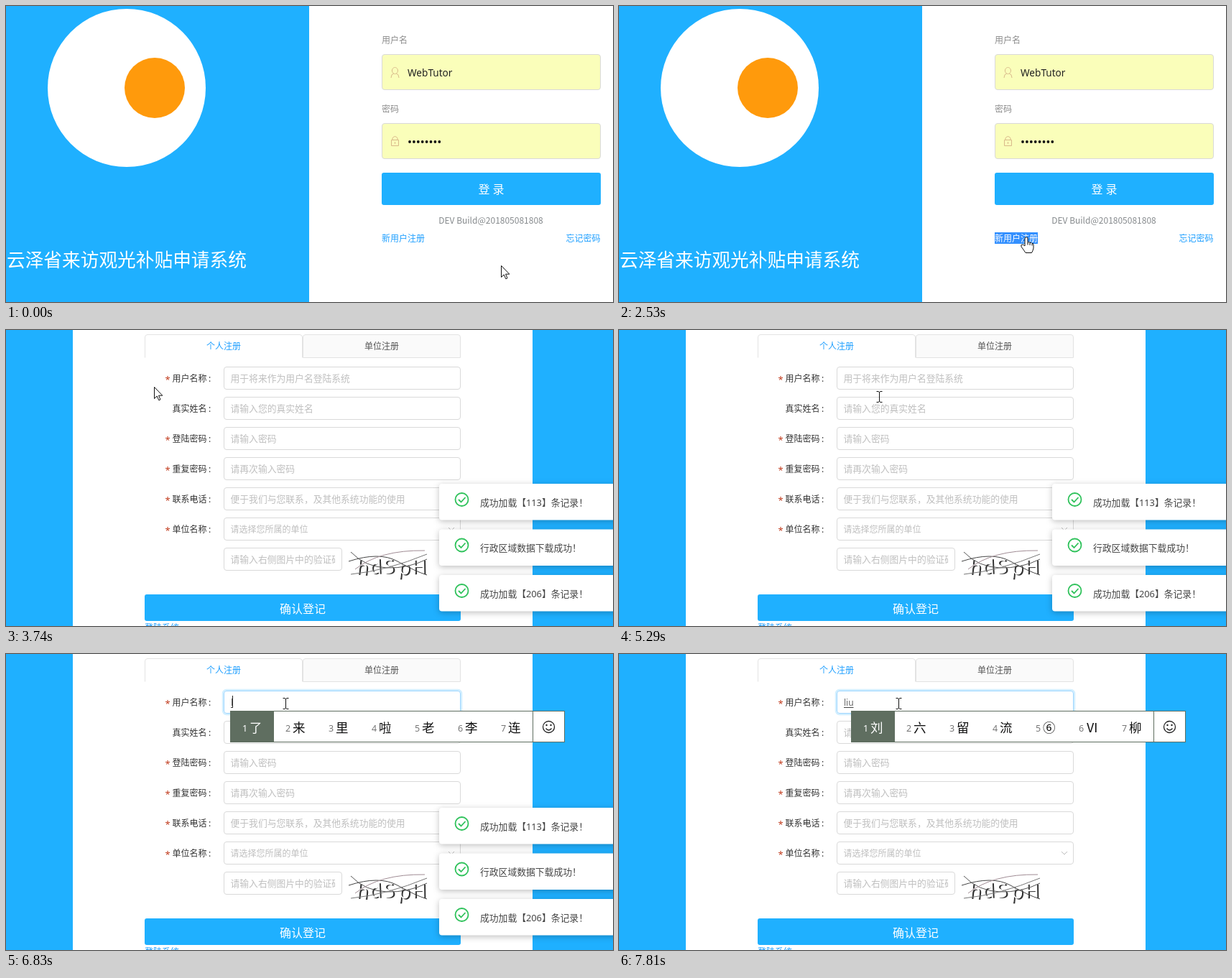
An HTML page for the animation above (8000 ms loop, 845 px wide and 412 px high).

```html
<!DOCTYPE html>
<html lang="zh-CN">
<head>
<meta charset="utf-8">
<style>
html, body { margin: 0; width: 100%; height: 100%; overflow: hidden; background: #fff; }
svg { display: block; }
#stage { width: 845px; height: 412px; }
text { font-family: "Noto Sans", "Noto Sans CJK SC", "Noto Sans CJK", sans-serif; white-space: pre; }
.narrow { font-family: "Noto Sans CJK SC", "Noto Sans CJK", sans-serif; }
</style>
</head>
<body>
<svg id="stage" viewBox="0 0 845 412">
  <g id="login"></g>
  <g id="register"></g>
  <g id="toasts"></g>
  <g id="ime"></g>
  <path id="cursor" stroke="#111" stroke-linejoin="round"/>
</svg>
<script>
const LOOP = 8000, BLUE = '#1fb0ff', LINK = '#1e9fff', HINT = '#bfbfbf', YELLOW = '#fafeba';
const ROW = 42;
const $ = id => document.getElementById(id);
const clamp = v => Math.max(0, Math.min(1, v));
const repeat = (n, make) => Array.from({ length: n }, (_, i) => make(i)).join('');

const text = (x, cy, size, fill, str, more = '') =>
  `<text x="${x}" y="${cy + size * .38}" font-size="${size}" fill="${fill}" ${more}>${str}</text>`;
const rect = (x, y, w, h, fill, more = '') =>
  `<rect x="${x}" y="${y}" width="${w}" height="${h}" fill="${fill}" ${more}/>`;
const box = (x, y, w, h, fill = '#fff', more = '') =>
  rect(x + .5, y + .5, w - 1, h - 1, fill, `rx="3.5" stroke="#d9d9d9" ${more}`);
const circle = (x, y, r, fill, more = '') =>
  `<circle cx="${x}" cy="${y}" r="${r}" fill="${fill}" ${more}/>`;
const line = (d, stroke, width = 1, fill = 'none') =>
  `<path d="${d}" fill="${fill}" stroke="${stroke}" stroke-width="${width}"/>`;
const MIDDLE = 'text-anchor="middle"';

// Login page
$('login').innerHTML =
  rect(0, 0, 845, 412, '#fff') + rect(0, 0, 422, 412, BLUE) +
  circle(168, 114, 110, '#fff') + circle(207, 114, 42, '#ff9a0c') +
  text(1, 353, 25.7, '#fff', '云泽省来访观光补贴申请系统') +
  text(523, 47.5, 12, '#8c8c8c', '用户名') +
  box(523, 67, 305, 50, YELLOW) +
  line('M541.5 85.5a4 4.5 0 1 1-.1 0M536 100q0-5 4-6.5M547 100q0-5-4-6.5', '#d9b98a') +
  text(559, 93, 13.6, '#222', 'WebTutor') +
  text(523, 143.5, 12, '#8c8c8c', '密码') +
  box(523, 163, 305, 50, YELLOW) +
  line('M536.500 186.500h10v8h-10zM538 186v-2q3.500-5 7 0v2M541.500 189v3', '#d9b98a') +
  repeat(8, i => circle(562 + i * 5.9, 189, 1.9, '#111')) +
  rect(523, 232, 305, 45, BLUE, 'id="enter" rx="3"') +
  text(675.5, 254.5, 16, '#fff', '登 录', MIDDLE) +
  text(675, 298.5, 12, '#85898c', 'DEV Build@201805081808', `${MIDDLE} class="narrow"`) +
  text(523, 323.5, 12, LINK, '新用户注册') +
  text(779.5, 323.5, 12, LINK, '忘记密码') +
  '<g id="selection">' + rect(523, 315, 60, 16, '#3390ff') +
  text(523, 323.5, 12, '#fff', '新用户注册') + '</g>';

// Registration page
const fields = [
  ['用户名称', '用于将来作为用户名登陆系统'],
  ['真实姓名', '请输入您的真实姓名', 'optional'],
  ['登陆密码', '请输入密码'],
  ['重复密码', '请再次输入密码'],
  ['联系电话', '便于我们与您联系，及其他系统功能的使用'],
  ['单位名称', '请选择您所属的单位'],
];
const form = fields.map(([label, hint, optional], i) => {
  const cy = 67.5 + i * ROW;
  return (optional ? '' : text(221.5, cy + 2, 13, '#c0391b', '*')) +
    text(231.5, cy, 12, '#333', label) + text(282, cy, 12, '#333', ':') +
    box(303, cy - 16.5, 330, 32, '#fff', `id="field${i}"`) +
    text(312.5, cy, i === 5 ? 12 : 12.8, HINT, hint, `id="hint${i}"`);
}).join('');

const letters = (shift, fill) => [...'hdSpH'].map((letter, i) => {
  const x = 487 + i * 19.5;
  return text(x + shift, 329 + shift / 2, 27, fill, letter, `transform="rotate(${6 * Math.cos(i * 2)} ${x} 338)"`);
}).join('');
const captcha = letters(2, '#333') + letters(0, '#fff') +
  line('M480 309Q500 330 530 331T586 319', '#555') +
  line('M477 322Q520 308 545 322T586 341', '#444') +
  line('M486 333Q520 306 583 307', '#a08c94') +
  line('M480 340Q530 335 586 312', '#777');

const tab = (x, fill, end) =>
  line(`M${x + .5} 38.5V10q0-3.500 3.500-3.500h212q3.500 0 3.500 3.500V38.500${end}`, '#e3e3e3', 1, fill);

$('register').innerHTML =
  rect(0, 0, 845, 412, BLUE) + rect(93, 0, 640, 412, '#fff') +
  tab(193, '#fff', '') + tab(413, '#fafafa', 'z') +
  text(303, 22.5, 12, LINK, '个人注册', MIDDLE) +
  text(523, 22.5, 12, '#555', '单位注册', MIDDLE) +
  rect(302, 50, 332, 34, 'none', `id="glow" rx="5" stroke="${BLUE}" stroke-width="2.5"`) +
  form + line('M616 275l4 4 4-4', '#bbb') +
  box(303, 303, 165, 32) +
  '<svg x="303" y="303" width="155" height="32" overflow="hidden">' +
  text(9.5, 16.5, 12.8, HINT, '请输入右侧图片中的验证码') + '</svg>' + captcha +
  rect(193, 368, 440, 37, BLUE, 'rx="3"') +
  text(413, 387.5, 16, '#fff', '确认登记', `${MIDDLE} font-weight="500"`) +
  text(193, 414.5, 12, LINK, '登陆系统');

// Notifications
const notes = ['成功加载【113】条记录！', '行政区域数据下载成功！', '成功加载【206】条记录！'];
$('toasts').innerHTML = notes.map(note =>
  '<g>' + rect(603, 0, 260, 50.5, '#fff', 'rx="4" style="filter:drop-shadow(0 2px 4px rgba(0,0,0,.25))"') +
  circle(634.5, 22, 9, 'none', 'stroke="#2fc25b" stroke-width="1.8"') +
  line('M630 22l3.500 3.500 6-6.500', '#2fc25b', 1.8) +
  text(660, 26, 12.8, '#444', note) + '</g>').join('');
const toasts = [...$('toasts').children];

// Input method
const FOCUS = 5740, BLINK = 545;
const entries = [
  { time: FOCUS, typed: '' },
  { time: 6830, typed: 'l', words: '了来里啦老李连' },
  { time: 7050, typed: 'li', words: '里李力离利理丽' },
  { time: 7150, typed: 'liu', words: '刘六留流⑥Ⅵ柳' },
];
const pen = document.createElement('canvas').getContext('2d');

function candidates(x, words) {
  const face = x + 443.5;
  return rect(x + .5, 79.5, 465, 43, '#fff', 'stroke="#5f6e60"') + rect(x, 79, 61, 44, '#5f6e60') +
    line(`M${x + 421.5} 79V123`, '#5f6e60') +
    [...words].map((word, i) =>
      text(x + 17 + i * 60, 103.5, 12.5, i ? '#777' : '#fff', i + 1) +
      text(x + 27 + i * 60, 102, 17.5, i ? '#111' : '#fff', word)).join('') +
    circle(face, 101.5, 8, 'none', 'stroke="#222" stroke-width="1.3"') +
    line(`M${face - 4} 103.500q4 5 8 0`, '#222', 1.3) +
    circle(face - 3, 99, 1.2, '#222') + circle(face + 3, 99, 1.2, '#222');
}

function inputMarkup({ time, typed, words }, now) {
  pen.font = '12px "Noto Sans", sans-serif';
  const caret = Math.floor(312.5 + pen.measureText(typed).width) + .5;
  const lit = Math.floor((now - time) / BLINK) % 2 === 0;
  return (lit ? line(`M${caret} 58V75`, '#222') : '') +
    (typed && text(313, 67.5, 12, '#666', typed) + line(`M313 74.500H${caret}`, '#444') +
      candidates(Math.round(caret - 4), words));
}

// Pointer: each run samples an eased path through a few key points
const steps = [];
function run(start, end, count, ...keys) {
  for (let i = 0; i < count; i++) {
    const u = i / (count - 1);
    const along = (1 - Math.cos(Math.PI * u)) / 2 * (keys.length - 1);
    const k = Math.min(Math.floor(along), keys.length - 2), f = along - k;
    const [x, y] = keys[k].map((v, axis) => Math.round(v + (keys[k + 1][axis] - v) * f));
    steps.push({ t: start + (end - start) * u, x, y });
  }
}
run(0, 890, 9, [689, 361], [600, 250], [490, 320]);
run(1010, 1760, 8, [497, 330], [635, 366], [502, 328]);
run(2190, 2530, 4, [512, 340], [567, 321]);
run(2960, 3740, 8, [570, 321], [206, 79]);
run(3860, 4610, 8, [210, 80], [320, 16], [460, 338]);
run(4730, 5290, 6, [497, 282], [375, 54], [362, 93]);
run(5400, 5740, 4, [362, 97], [389, 69]);

const shapes = {
  arrow: 'M.5.5V16.500L4.200 13 6.800 18.800 9 17.800 6.500 12.200H11.800Z',
  hand: 'M-2 13V2Q0-1 2 2V8.500Q4 6.500 5 8.500Q7 7.500 8 9.500Q10 8.500 10 11.500V16Q9.500 19 7.500 22.500H-1Q-4 18-7 14Q-8 11-5.500 11Q-4 11-2 13ZM2 8.500V11.500M5 9V12M8 10V12.500',
  beam: 'M-3.500-7.500H-1L.5-6.500 2-7.500H4.500M.5-6.500V6.500M-3.500 7.500H-1L.5 6.500 2 7.500H4.500',
};
const inside = (p, x, y, w, h) => p.x >= x && p.x < x + w && p.y >= y && p.y < y + h;
const onEnter = p => inside(p, 523, 232, 305, 45);

function pointerShape(p) {
  if (p.t < 2960) return onEnter(p) || inside(p, 523, 315, 60, 16) ? 'hand' : 'arrow';
  if (inside(p, 477, 303, 110, 42) || inside(p, 303, 261, 330, 32)) return 'hand';
  const onField = inside(p, 303, 51, 330, 200) || inside(p, 303, 303, 165, 32);
  return onField && (p.y - 51) % ROW < 32 ? 'beam' : 'arrow';
}

const show = (el, on) => el.style.display = on ? '' : 'none';
const set = (el, attrs) => Object.entries(attrs).forEach(([name, value]) => el.setAttribute(name, value));

function draw(now) {
  const pointer = steps.filter(s => s.t <= now).pop();
  const entry = entries.filter(e => e.time <= now).pop();
  const registering = now >= 2960;

  show($('login'), !registering);
  show($('register'), registering);
  show($('toasts'), registering);
  set($('enter'), { fill: onEnter(pointer) ? '#4cc0ff' : BLUE });
  show($('selection'), now > 1650);

  set($('glow'), { opacity: .2 * clamp((now - FOCUS) / 300) });
  set($('field0'), { stroke: entry ? '#9fd6ff' : '#d9d9d9' });
  show($('hint0'), !entry?.typed);
  $('ime').innerHTML = entry ? inputMarkup(entry, now) : '';

  toasts.forEach((toast, i) => {
    const shown = clamp((now - 3130 - i * 110) / 300);
    set(toast, {
      transform: `translate(${250 * (1 - shown) ** 2} ${214 + i * 63.5})`,
      opacity: shown * clamp(1 - (now - 7500) / 300),
    });
  });

  const kind = pointerShape(pointer);
  set($('cursor'), {
    d: shapes[kind],
    fill: kind === 'beam' ? 'none' : '#fff',
    transform: `translate(${pointer.x} ${pointer.y})`,
  });
}

function tick() {
  draw(performance.now() % LOOP);
  requestAnimationFrame(tick);
}
tick();
</script>
</body>
</html>
```
